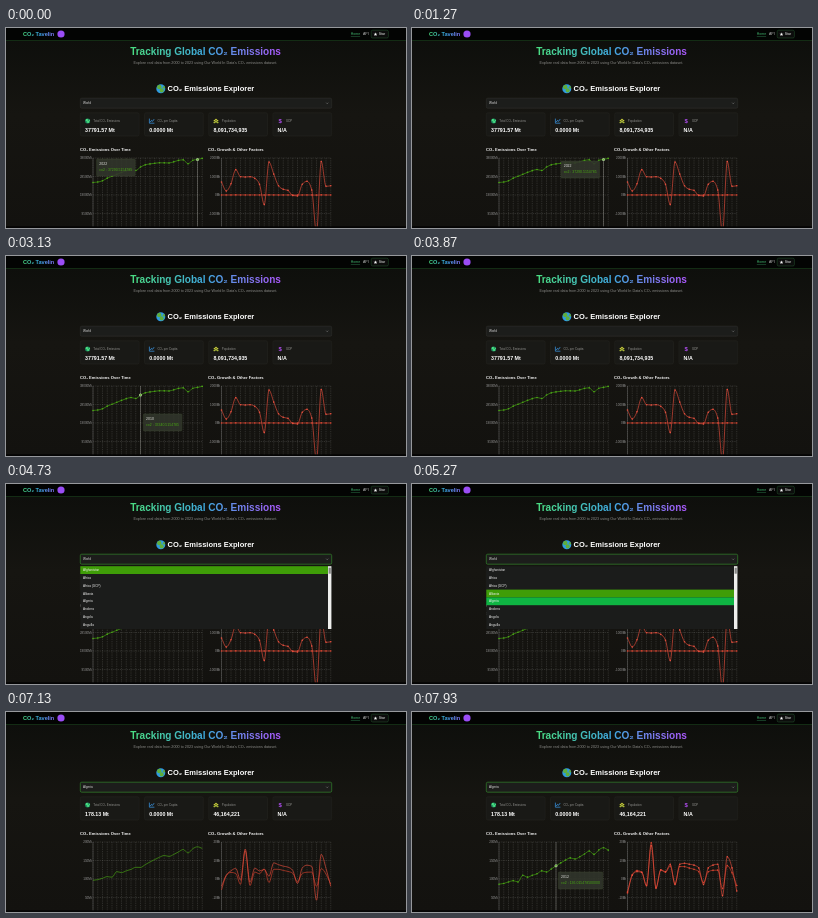
An HTML page with a canvas for the animation above (8000 ms loop, 400 by 200 pixels).

```html
<!DOCTYPE html>
<html lang="en">
<head>
<meta charset="utf-8">
<title>Emissions dashboard</title>
<style>
html, body { margin: 0; width: 100%; height: 100%; overflow: hidden; background: #12110e; }
canvas { display: block; width: 400px; height: 200px; }
</style>
</head>
<body>
<canvas id="stage"></canvas>
<script>
const W = 400, H = 200, LOOP = 8000;
const canvas = document.getElementById('stage');
const ctx = canvas.getContext('2d');
const dpr = window.devicePixelRatio || 1;
canvas.width = W * dpr;
canvas.height = H * dpr;

const FONT = '"Liberation Sans", Arial, sans-serif';
const GREEN = '#4aa814', RED = '#e8503e', LIME = '#3f9d08';
const OPEN = 4270, CLOSE = 6100, SELECT = 6270, MORPH = 6420, MORPH_END = 7900;

// Yearly change from 2000 on; levels and percentages follow from it.
function series(start, growth) {
  let level = start;
  const levels = [], percent = [];
  for (const g of growth) {
    percent.push(g / level * 100);
    levels.push(level += g);
  }
  return { levels, growth, percent };
}

const world = {
  ...series(24750, [700, 220, 610, 1370, 990, 970, 990, 900, 580, -520, 1780, 1130,
    500, 310, 250, -30, -50, 580, 740, 270, -2030, 1810, 470, 500]),
  name: 'World', max: 38000, step: 1000, digits: 7,
  values: ['37791.57 Mt', '0.0000 Mt', '8,091,734,935', 'N/A']
};
const algeria = {
  ...series(93, [-7, 2, 4, 3.5, -3.5, 18, -5, 5, 4, 8, -3, 8,
    8.5, 8, 7.5, 6, -3, 6, 7.5, 8, -9, 12, 6, -6.5]),
  name: 'Algeria', max: 200, step: 10, digits: 12,
  values: ['178.13 Mt', '0.0000 Mt', '46,164,221', 'N/A']
};
const countries = ['Afghanistan', 'Africa', 'Africa (GCP)', 'Albania', 'Algeria', 'Andorra', 'Angola', 'Anguilla'];
const labels = ['Total CO₂ Emissions', 'CO₂ per Capita', 'Population', 'GDP'];

const clamp = v => Math.max(0, Math.min(1, v));
const lerp = (a, b, k) => a + (b - a) * k;
const progress = (t, from, to) => clamp((t - from) / (to - from));

// cubic-bezier(.25, .1, .25, 1)
function ease(x) {
  let lo = 0, hi = 1, s = x;
  for (let n = 0; n < 16; n++) {
    s = (lo + hi) / 2;
    const bx = .75 * s * (1 - s) * (1 - s) + .75 * s * s * (1 - s) + s * s * s;
    if (bx < x) lo = s; else hi = s;
  }
  return .3 * s * (1 - s) * (1 - s) + 3 * s * s * (1 - s) + s * s * s;
}

// Keys are [time, x, y].
function track(keys, t) {
  let k = 0;
  while (k < keys.length - 2 && t >= keys[k + 1][0]) k++;
  const [a, b] = [keys[k], keys[k + 1]];
  const p = progress(t, a[0], b[0]);
  return [lerp(a[1], b[1], p), lerp(a[2], b[2], p)];
}

function text(str, x, y, size, color, { bold = false, align = 'left' } = {}) {
  ctx.font = `${bold ? 'bold ' : ''}${size}px ${FONT}`;
  ctx.textAlign = align;
  ctx.textBaseline = 'alphabetic';
  ctx.fillStyle = color;
  ctx.fillText(str, x, y);
}

function rect(x, y, w, h, color) {
  ctx.fillStyle = color;
  ctx.fillRect(x, y, w, h);
}

function box(x, y, w, h, r, fill, stroke, width = .4) {
  ctx.beginPath();
  ctx.roundRect(x, y, w, h, r);
  if (fill) { ctx.fillStyle = fill; ctx.fill(); }
  if (stroke) { ctx.strokeStyle = stroke; ctx.lineWidth = width; ctx.stroke(); }
}

function disc(x, y, r, color) {
  ctx.beginPath();
  ctx.arc(x, y, r, 0, Math.PI * 2);
  ctx.fillStyle = color;
  ctx.fill();
}

function line(points, color, width) {
  ctx.beginPath();
  points.forEach(([x, y]) => ctx.lineTo(x, y));
  ctx.strokeStyle = color;
  ctx.lineWidth = width;
  ctx.stroke();
}

function gradient(x0, x1, ...colors) {
  const g = ctx.createLinearGradient(x0, 0, x1, 0);
  colors.forEach((c, i) => g.addColorStop(i / (colors.length - 1), c));
  return g;
}

function globe(x, y, r, sea, land) {
  disc(x, y, r, sea);
  ctx.save();
  ctx.clip();
  disc(x - r * .35, y - r * .4, r * .5, land);
  disc(x + r * .2, y + r * .35, r * .45, land);
  disc(x + r * .75, y - r * .35, r * .3, land);
  ctx.restore();
}

function header() {
  const bg = ctx.createLinearGradient(0, 12, 0, H);
  bg.addColorStop(0, '#0e0f0c');
  bg.addColorStop(.4, '#161511');
  bg.addColorStop(1, '#13120f');
  rect(0, 0, W, H, bg);
  rect(0, 0, W, 12, '#030403');
  rect(0, 12, W, .6, '#17401a');
  text('CO₂ Tavelin', 17, 8, 5.6, gradient(17, 50, '#4ade80', '#38a8e8', '#8b6cf6'), { bold: true });
  disc(55, 6, 3.6, '#9a4df5');
  text('Home', 344.8, 7.2, 3.5, '#43bd72');
  rect(344.8, 8, 9.3, .3, '#43bd72');
  text('API', 357, 7.2, 3.5, '#c4c4c4');
  box(365.2, 2.2, 17.2, 7.8, 1.5, '#0c0d0c', '#2f6a3c');
  text('★', 367.2, 7.8, 5, '#fff');
  text('Star', 372.8, 7.2, 3.5, '#eee');

  text('Tracking Global CO₂ Emissions', 199.5, 27.2, 10.05,
    gradient(124, 275, '#4ade80', '#3fa9e0', '#a855f7'), { bold: true, align: 'center' });
  text('Explore real data from 2000 to 2023 using Our World In Data\'s CO₂ emissions dataset.',
    199.3, 36.3, 3.76, '#8d8d8a', { align: 'center' });
  globe(154.8, 60.8, 4.5, '#2f9be0', '#5fae3c');
  text('CO₂ Emissions Explorer', 161.6, 63.3, 7.5, '#fff', { bold: true });
}

function selectBox(name, focused) {
  box(74.3, 70.2, 251.4, 10, 1.4, '#1c1d1b', focused ? '#38962f' : '#3a3a38', focused ? .6 : .4);
  text(name, 77, 76.4, 3.1, '#ddd');
  line([[320.2, 74.7], [321.2, 75.7], [322.2, 74.7]], '#bbb', .4);
}

const icons = [
  (x, y) => globe(x, y, 2.5, '#1f8f62', '#4ade80'),
  (x, y) => {
    line([[x - 2.4, y - 2.4], [x - 2.4, y + 2.2], [x + 2.6, y + 2.2]], '#3b9cf0', .7);
    line([[x - 1.5, y + 1], [x - .3, y - .6], [x + .7, y + .3], [x + 2.3, y - 1.8]], '#3b9cf0', .8);
  },
  (x, y) => [[-1.6, .2, .8], [1.6, .2, .8], [0, -.6, 1]].forEach(([dx, dy, r]) => {
    disc(x + dx, y + dy - .6, r, '#c5c93a');
    box(x + dx - r * 1.2, y + dy + .6, r * 2.4, 1.4, .6, '#a9b838');
  }),
  (x, y) => text('$', x, y + 2.1, 6, '#b04df0', { bold: true, align: 'center' })
];

function cards(values) {
  values.forEach((value, i) => {
    const x = 74.3 + i * 64.2;
    box(x, 84.8, 58.8, 23.2, 1.6, '#191916', '#2b2b27');
    icons[i](x + 7.3, 93);
    text(labels[i], x + 13, 94.1, 2.95, '#92928f');
    text(value, x + 4.7, 104, 5.3, '#fff', { bold: true });
  });
}

const STEP = 4.75, TOP = 130, TICK = 18.5;
const LEFT = 87, RIGHT = 215.5;

function grid(x0, ticks) {
  const end = x0 + 23 * STEP;
  ctx.setLineDash([.9, .9]);
  for (let x = x0; x <= end; x += STEP) line([[x, TOP], [x, H]], '#666662', .4);
  ticks.forEach((_, i) => line([[x0, TOP + i * TICK], [end, TOP + i * TICK]], '#666662', .4));
  ctx.setLineDash([]);
  line([[x0, TOP], [x0, H]], '#777', .4);
  ticks.forEach((v, i) => text(v + 'Mt', x0 - 1.4, TOP + i * TICK + 1.1, 3, '#999', { align: 'right' }));
}

// Monotone cubic curve through evenly spaced points.
function curve(x0, ys, color, dots) {
  const d = ys.slice(1).map((y, i) => y - ys[i]);
  const m = ys.map((_, i) => {
    if (i === 0) return d[0];
    if (i === d.length) return d[i - 1];
    const [a, b] = [d[i - 1], d[i]];
    return a * b <= 0 ? 0 : Math.sign(a) * Math.min(Math.abs(a), Math.abs(b), Math.abs(a + b) / 4) * 2;
  });
  ctx.beginPath();
  ctx.moveTo(x0, ys[0]);
  for (let i = 0; i < d.length; i++) {
    const x = x0 + i * STEP;
    ctx.bezierCurveTo(x + STEP / 3, ys[i] + m[i] / 3, x + STEP * 2 / 3, ys[i + 1] - m[i + 1] / 3, x + STEP, ys[i + 1]);
  }
  ctx.strokeStyle = color;
  ctx.lineWidth = .65;
  ctx.stroke();
  if (dots) ys.forEach((y, i) => disc(x0 + i * STEP, y, .8, color));
}

const levelY = (v, data) => TOP + 4 * TICK * (1 - v / data.max);
const growthY = (v, data) => TOP + 2 * TICK - v / data.step * TICK;

function charts(t, data) {
  text('CO₂ Emissions Over Time', 74, 123.4, 4.1, '#f4f4f4', { bold: true });
  text('CO₂ Growth & Other Factors', 202, 123.4, 4.1, '#f4f4f4', { bold: true });
  grid(LEFT, [4, 3, 2, 1].map(n => data.max * n / 4));
  grid(RIGHT, [2, 1, 0, -1].map(n => data.step * n));
  const k = ease(progress(t, MORPH, MORPH_END));
  const dots = t < SELECT || t >= MORPH_END;
  const blend = (key, toY) => world[key].map((v, i) => lerp(toY(v, world), toY(algeria[key][i], algeria), k));
  const levels = blend('levels', levelY);
  curve(LEFT, levels, GREEN, dots);
  curve(RIGHT, blend('percent', growthY), '#d8432f', dots);
  curve(RIGHT, blend('growth', growthY), RED, dots);
  return levels;
}

const firstHover = [[0, 90.5, 131], [500, 149, 133], [1270, 149, 133], [1870, 137.4, 145],
  [2700, 137.4, 158], [3130, 137.4, 158], [3500, 137.4, 134]];
const lastHover = [[7330, 123, 150], [7800, 146.4, 160], [LOOP, 146.4, 160]];

function tooltip(t, data, levels) {
  let index, keys;
  if (t < 3530) {
    index = Math.round(lerp(22, 10, progress(t, 1270, 1830)));
    keys = firstHover;
  } else if (t >= 7330) {
    index = Math.round(lerp(7, 12, progress(t, 7330, 7800)));
    keys = lastHover;
  } else return;

  const px = LEFT + index * STEP;
  line([[px, TOP], [px, H]], 'rgba(200,200,196,.6)', .5);
  disc(px, levels[index], 1.5, '#b4c8a6');
  disc(px, levels[index], 1, '#6cb83c');

  const [x, y] = track(keys, t);
  const value = (data.levels[index] + .5154785).toFixed(data.digits);
  const label = 'co2 : ' + value;
  ctx.font = `3.5px ${FONT}`;
  box(x, y, ctx.measureText(label).width + 5.6, 17, .8, 'rgba(50,54,44,.88)', '#3d4a31');
  text(2000 + index, x + 2.7, y + 6.3, 3.5, '#e4e4e0');
  text(label, x + 2.7, y + 12.1, 3.5, GREEN);
}

function dropdown(t) {
  const rowH = 7.8, top = 82.2;
  const row = t < 4870 ? 0 : t < 4980 ? 1 : t < 5130 ? 2 : t < 5330 ? 3 : 4;
  rect(74.3, top, 251.4, 62.8, '#1b1c1b');
  rect(74.3, top + row * rowH, 247.7, rowH, LIME);
  if (t >= 5270 && t < 5330) rect(74.3, top + 4 * rowH, 247.7, rowH, '#0fb443');
  countries.forEach((name, i) => text(name, 77, top + i * rowH + 5, 3.1, '#eee'));
  rect(322, top, 3.4, 62.8, '#eeeeec');
  rect(322.6, top + 1.5, 2.2, 6, '#868684');
}

function draw(t) {
  ctx.setTransform(dpr, 0, 0, dpr, 0, 0);
  const data = t < SELECT ? world : algeria;
  header();
  selectBox(data.name, t >= OPEN);
  cards(data.values);
  const levels = charts(t, data);
  tooltip(t, data, levels);
  if (t >= OPEN && t < CLOSE) dropdown(t);
  rect(0, 198.3, W, 1.7, '#040404');
}

function frame() {
  draw(performance.now() % LOOP);
  requestAnimationFrame(frame);
}
frame();
</script>
</body>
</html>
```
